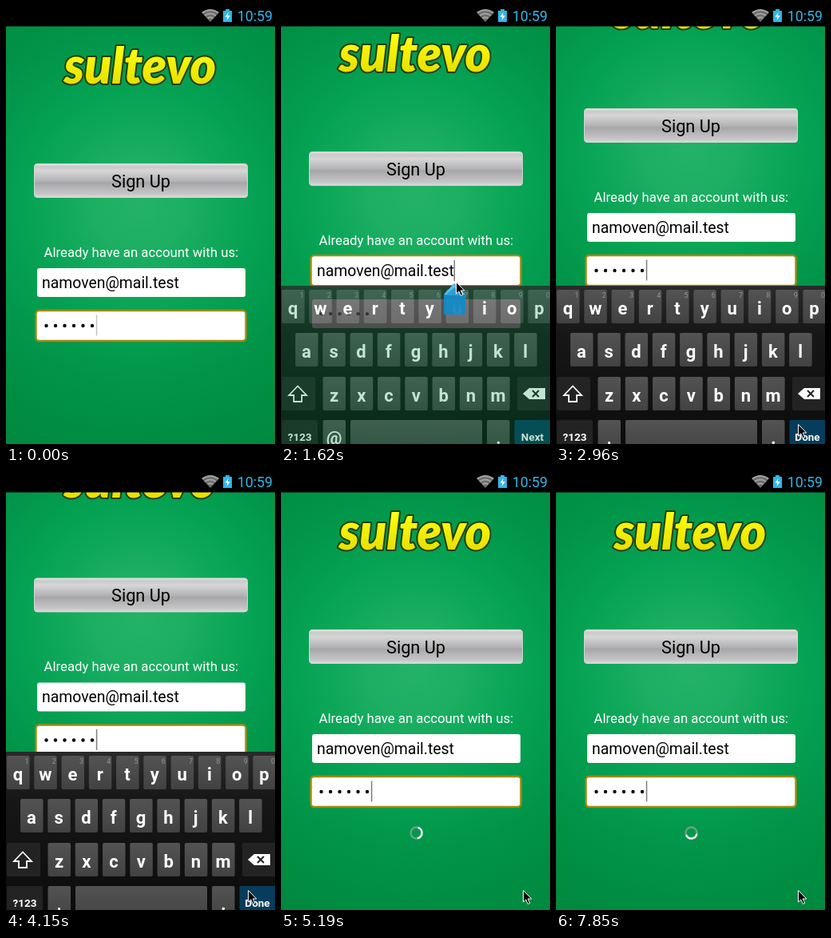
These frames come from a looping animation (337 px wide and 548 px high, 8 s). An HTML page:

```html
<!DOCTYPE html>
<html lang="en">
<head>
<meta charset="utf-8">
<title>Sign in screen</title>
<style>
html, body { margin: 0; width: 100%; height: 100%; overflow: hidden; background: #000; }
svg { display: block; width: 337px; height: 548px; }
text { font-family: Roboto, "Open Sans", sans-serif; }
#keys text { fill: #fff; font-weight: bold; text-anchor: middle; }
#keys .hint { fill: #969696; font-size: 9px; font-weight: normal; }
</style>
</head>
<body>
<svg viewBox="0 0 337 548">
  <defs>
    <radialGradient id="glow" gradientUnits="userSpaceOnUse" cx="168" cy="249" r="345">
      <stop offset="0" stop-color="#24b268"/>
      <stop offset=".18" stop-color="#1cae62"/>
      <stop offset=".3" stop-color="#0fa85a"/>
      <stop offset=".42" stop-color="#06a253"/>
      <stop offset=".54" stop-color="#039b4e"/>
      <stop offset=".68" stop-color="#019347"/>
      <stop offset="1" stop-color="#00883e"/>
    </radialGradient>
    <linearGradient id="metal" x2="0" y2="1">
      <stop offset="0" stop-color="#e4e4e5"/>
      <stop offset=".08" stop-color="#c9c9ca"/>
      <stop offset=".2" stop-color="#d6d6d7"/>
      <stop offset=".52" stop-color="#b2b2b4"/>
      <stop offset=".56" stop-color="#a6a6a8"/>
      <stop offset=".9" stop-color="#c6c6c7"/>
      <stop offset="1" stop-color="#dcdcdd"/>
    </linearGradient>
    <linearGradient id="gold" x2="0" y2="1">
      <stop offset=".2" stop-color="#ffff12"/>
      <stop offset=".85" stop-color="#e6de00"/>
    </linearGradient>
    <linearGradient id="board" x2="0" y2="1">
      <stop offset="0" stop-color="#2a2a2a"/>
      <stop offset=".3" stop-color="#171717"/>
      <stop offset="1" stop-color="#0c0c0c"/>
    </linearGradient>
    <linearGradient id="cap" x2="0" y2="1">
      <stop offset="0" stop-color="#535353"/>
      <stop offset="1" stop-color="#424242"/>
    </linearGradient>
  </defs>

  <g id="page">
    <rect y="25" width="337" height="620" fill="url(#glow)"/>
    <text x="168" y="97" text-anchor="middle" font-size="62" fill="url(#gold)" stroke="#234008"
      stroke-width="4" stroke-linejoin="round" paint-order="stroke"
      style="font-family:Lato,sans-serif;font-weight:900;font-style:italic">sultevo</text>
    <rect x="35.5" y="197.5" width="267" height="42" rx="3.5" fill="url(#metal)" stroke="#d4d8d5"/>
    <text x="169" y="227" text-anchor="middle" font-size="21.7">Sign Up</text>
    <text x="47.5" y="314" font-size="16.75" fill="#fff">Already have an account with us:</text>
    <rect x="39" y="328" width="261" height="36" rx="3" fill="#fff"/>
    <rect x="39" y="382" width="261" height="36" rx="3" fill="#fff"/>
    <rect id="focus" x="37.5" width="263" height="38" rx="4" fill="#fff" stroke="#a58a0c" stroke-width="2.4"/>
    <text x="45" y="353" font-size="19.4">namoven@mail.test</text>
    <g id="dots"></g>
    <rect id="caret" width="1.5" height="26" fill="#7c7c7c"/>
    <g id="spin" fill="none" stroke-width="2.4">
      <circle r="7" stroke="#8fa398" stroke-opacity=".75"/>
      <path d="M-7 0A7 7 0 0 1 5 -4.9" stroke="#f1f5f2" stroke-linecap="round"/>
    </g>
  </g>

  <g id="keys"></g>

  <g id="handle">
    <path d="M217 347L231 361V384Q231 386 229 386H206Q204 386 204 384V361Z" fill="#1689c6" fill-opacity=".95"/>
    <path d="M217 347L231 361H204Z" fill="#5dc1ea"/>
    <path d="M217 352L228 362H206Z" fill="#2d9fd6"/>
  </g>

  <g id="status">
    <rect width="337" height="25.5"/>
    <path d="M256 20L245 8Q256 0 267 8Z" fill="#6d6d6d"/>
    <g fill="none" stroke="#a3a3a3" stroke-width="2">
      <path d="M246 8.5Q256 1.500 266 8.500"/>
      <path d="M249 12Q256 7 263 12"/>
      <path d="M252.500 15.500Q256 13 259.500 15.500"/>
    </g>
    <path d="M272 6H275V4H280V6H283V20H272Z" fill="#33b5e5"/>
    <path d="M278.500 8L274.500 13.500H277.500L276.500 18L280.800 12H277.800Z" fill="#fff"/>
    <text x="334" y="19" text-anchor="end" font-size="17.8" fill="#33b5e5">10:59</text>
  </g>

  <path id="mouse" d="M.5 .5V15L3.800 12L6.300 17.500L8.700 16.400L6.300 11H10.800Z" fill="#000" stroke="#fff" stroke-width="1"/>
</svg>
<script>
const LOOP = 8000, STEP = 148.15;
const $ = id => document.getElementById(id);
const NS = 'http://www.w3.org/2000/svg';

function add(parent, tag, attrs, text) {
  const el = document.createElementNS(NS, tag);
  for (const name in attrs) el.setAttribute(name, attrs[name]);
  if (text) el.textContent = text;
  parent.appendChild(el);
  return el;
}

function buildKeys() {
  const g = $('keys');
  const cap = (x, y, width, fill = 'url(#cap)') =>
    add(g, 'rect', { x, y, width, height: 42, rx: 2, fill });
  const label = (x, y, size, text) => add(g, 'text', { x, y, 'font-size': size }, text);

  add(g, 'rect', { y: 350, width: 337, height: 198, fill: 'url(#board)' });
  [['qwertyuiop', 15, 355], ['asdfghjkl', 32, 409], ['zxcvbnm', 66.5, 464]].forEach(([row, left, y]) => {
    [...row].forEach((ch, i) => {
      const x = left + i * 34.27;
      cap(x - 14, y, 28.5);
      label(x, y + 30.5, 22, ch);
      if (y === 355) add(g, 'text', { x: x + 11, y: 365, class: 'hint' }, String((i + 1) % 10));
    });
  });

  cap(1, 464, 42, '#232323');
  add(g, 'path', { d: 'M21 475.500L32 487H26V495H16V487H10Z', fill: 'none', stroke: '#fff', 'stroke-width': 1.8 });
  cap(296, 464, 42, '#232323');
  add(g, 'path', { d: 'M303 485L311 478H331V492H311Z', fill: '#fff' });
  add(g, 'path', { d: 'M315 481L323 489M323 481L315 489', stroke: '#222', 'stroke-width': 2 });

  cap(1, 518, 45, '#232323');
  label(23.5, 544, 13.5, '?123');
  cap(52.500, 518, 28.500);
  const side = label(66.500, 548, 22, '@');
  cap(87, 518, 165);
  cap(258, 518, 28.500);
  label(272.500, 548, 22, '.');
  const action = cap(292.500, 518, 46);
  const name = label(315, 544, 13.5, 'Next');
  return { side, action, name };
}

const keys = buildKeys();
for (let i = 0; i < 6; i++) add($('dots'), 'circle', { cx: 50.5 + i * 11.5, cy: 400, r: 2.2 });

const ramp = (t, start, length) => Math.min(1, Math.max(0, (t - start) / length));
const slow = p => 1 - (1 - p) ** 2;
const smooth = p => p * p * (3 - 2 * p);
const mix = (a, b, p) => a + (b - a) * p;
const show = (id, on) => $(id).setAttribute('visibility', on ? 'visible' : 'hidden');
const move = (id, x, y) => $(id).setAttribute('transform', `translate(${x} ${y})`);

function draw(time) {
  const t = Math.floor((time + 12) / STEP) * STEP;
  const email = t > 1150 && t < 2750;

  const pan = -15 * slow(ramp(t, 1400, 250))
    - 54 * slow(ramp(t, 2700, 250))
    + 69 * slow(ramp(t, 4140, 250));
  move('page', 0, pan);

  $('focus').setAttribute('y', email ? 327 : 381);
  $('caret').setAttribute('x', email ? 216.5 : 112.8);
  $('caret').setAttribute('y', email ? 333 : 386.5);
  $('caret').setAttribute('opacity', t < 290 ? 0.45 : 1);
  show('caret', (email ? t - 1180 : t + 300) % 1000 < 500);

  show('spin', t > 4400);
  $('spin').setAttribute('transform', `translate(169.5 451.5) rotate(${t * 0.3 % 360})`);

  const shown = ramp(t, 1400, 300) - ramp(t, 4270, 240);
  $('keys').setAttribute('opacity', shown);
  show('handle', t > 1600 && email);
  keys.side.textContent = email ? '@' : ',';
  keys.name.textContent = email ? 'Next' : 'Done';
  keys.action.setAttribute('fill', t > 2600 && email ? '#0b5a84' : '#063d5c');

  const up = smooth(ramp(t, 590, 450)), down = smooth(ramp(t, 1700, 800));
  move('mouse', mix(mix(262, 219, up), 303, down), mix(mix(474, 345, up), 523, down));
  show('mouse', t > 580);
}

const start = performance.now();
function tick() {
  draw((performance.now() - start) % LOOP);
  requestAnimationFrame(tick);
}
tick();
</script>
</body>
</html>
```
